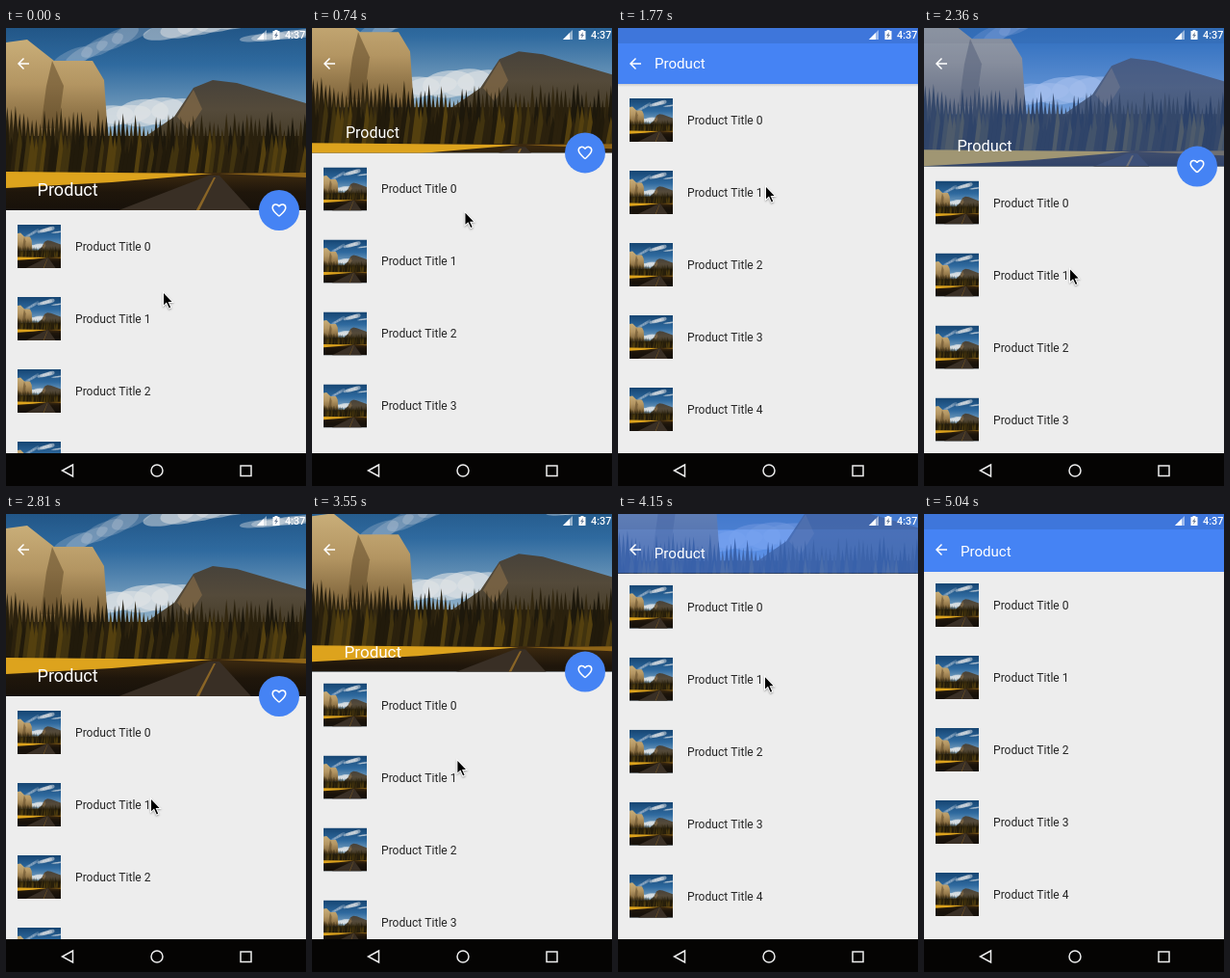
These frames come from a looping animation (312 by 475 pixels, 5400 ms). An HTML page with a canvas:

```html
<!DOCTYPE html>
<html lang="en">
<head>
<meta charset="utf-8">
<title>Collapsing header</title>
<style>
  html, body { margin: 0; width: 100%; height: 100%; overflow: hidden; background: #ededed; }
  canvas { display: block; width: 100vw; height: 100vh; }
</style>
</head>
<body>
<canvas id="stage"></canvas>
<script>
const W = 312, H = 475, NAV = 441;
const FULL = 189, MIN = 58, REST = 60;
const LOOP = 5400, STEP = 147.7;
const PHOTO_TOP = -34, PHOTO_H = 245;
const BLUE = '#4583f4';
const canvas = document.getElementById('stage');
const ctx = canvas.getContext('2d');

const clamp = v => Math.max(0, Math.min(1, v));
const mix = (a, b, t) => a + (b - a) * t;
const phase = (s, from, to) => clamp((s - from) / (to - from));
const rand = n => { const v = Math.sin(n * 127.1) * 43758.5453; return v - Math.floor(v); };

// Three drags: up, down, up again.
function poseAt(s) {
  const first = phase(s, 2, 8.6);
  const down = 1 - (1 - phase(s, 12, 19)) ** 1.25;
  const lift = phase(s, 21, 28.05);
  const leave = phase(s, 29, 33);
  const up = lift ** 1.9;
  const head = s < 12 ? mix(FULL, MIN, first)
    : s < 21 ? mix(MIN, FULL, down)
    : mix(FULL, REST, up);
  const grip = s < 12 ? mix(275, 150, phase(s, 2, 6.5))
    : s < 21 ? head + 107
    : mix(296, 168, lift ** 1.36);
  return {
    head,
    scroll: s < 12 ? 15 * phase(s, 8, 9) : 3 * phase(s, 21, 24),
    scrim: phase(s, 5.2, 9) - phase(s, 13.6, 17.6) + phase(s, 25.4, 29.2),
    x: 164 - 10 * first - 3 * down + 2 * up + 97 * leave,
    y: mix(grip, 443, leave),
    pointer: s < 34
  };
}

function rect(color, x, y, w, h) {
  ctx.fillStyle = color;
  ctx.fillRect(x, y, w, h);
}

function trace(...p) {
  ctx.beginPath();
  for (let i = 0; i < p.length; i += 2) ctx.lineTo(p[i], p[i + 1]);
  ctx.closePath();
}

function poly(color, ...p) {
  ctx.fillStyle = color;
  trace(...p);
  ctx.fill();
}

function disc(color, x, y, rx, ry = rx, tilt = 0) {
  ctx.fillStyle = color;
  ctx.beginPath();
  ctx.ellipse(x, y, rx, ry, tilt, 0, Math.PI * 2);
  ctx.fill();
}

function text(str, x, y, size, color, weight = 400) {
  ctx.font = `${weight} ${size}px Roboto, sans-serif`;
  ctx.fillStyle = color;
  ctx.fillText(str, x, y);
}

function clipped(x, y, w, h, draw) {
  ctx.save();
  ctx.beginPath();
  ctx.rect(x, y, w, h);
  ctx.clip();
  draw();
  ctx.restore();
}

function vertical(y0, y1, ...colors) {
  const g = ctx.createLinearGradient(0, y0, 0, y1);
  colors.forEach((c, i) => g.addColorStop(i / (colors.length - 1), c));
  return g;
}

// Overlapping puffs make one soft cloud.
function cloud(x, y, w, h, tilt, alpha) {
  for (let i = 0; i < 5; i++) {
    const d = (i - 2) * w / 5;
    disc(`rgba(225,228,230,${alpha})`, x + d, y + d * tilt, w * .3, h * (.6 + rand(i + x) * .4), tilt);
  }
}

function pines(base, rise, tones, seed) {
  for (let i = 0; i < 75; i++) {
    const x = i * 4.3 - 3;
    const top = base - rise * (.55 + .45 * rand(i + seed)) + 8 * clamp(x / 160);
    ctx.fillStyle = tones[Math.floor(rand(i + seed + 200) * tones.length)];
    trace(x, top, x + 6, 152, x - 6, 152);
    ctx.fill();
  }
}

function scene() {
  rect(vertical(PHOTO_TOP, 110, '#164572', '#2f6a9f', '#8fb0c8'), 0, PHOTO_TOP, W, PHOTO_H);
  cloud(100, 18, 80, 10, -.45, .22);
  cloud(205, -4, 90, 13, -.2, .5);
  cloud(285, 8, 60, 5, -.1, .4);
  cloud(142, 88, 90, 15, -.1, .6);

  poly(vertical(12, 105, '#c9ae79', '#b39562', '#7d633a'),
    0, 15, 22, 12, 50, 34, 90, 34, 102, 54, 106, 112, 0, 112);
  poly('rgba(90,68,36,.5)', 48, 34, 60, 60, 54, 104, 36, 104, 42, 60);
  poly(vertical(54, 115, '#47423a', '#544a3a', '#463c28'),
    140, 116, 175, 92, 195, 62, 215, 54, 240, 57, W, 78, W, 118);
  poly('rgba(140,112,74,.6)', 178, 92, 195, 64, 204, 84, 190, 106);

  rect('#2a210f', 0, 112, W, 40);
  pines(122, 44, ['#1d180c', '#2a210e', '#332811'], 1);
  pines(138, 42, ['#211a0b', '#41330f', '#54400f', '#2b210d'], 400);

  rect(vertical(150, 190, '#3d2a10', '#1f160b', '#17110a'), 0, 150, W, 61);
  poly('#dda31d', 0, 149, 215, 151, 110, 160, 0, 166);
  poly('#8e6417', 222, 151, W, 150, W, 155);
  poly('#392f25', 211, 153, 222, 153, 275, 211, 60, 211);
  poly('#8a6526', 216, 155, 218, 155, 190, 211, 186, 211);
}

function list(head, scroll) {
  clipped(0, head, W, NAV - head, () => {
    for (let i = 0; i < 6; i++) {
      const y = head + 15 - scroll + i * 75;
      clipped(12, y, 45, 45, () => {
        ctx.translate(12, y);
        ctx.scale(45 / W, 45 / PHOTO_H);
        ctx.translate(0, -PHOTO_TOP);
        scene();
      });
      text('Product Title ' + i, 72, y + 27, 12.1, '#252525');
    }
  });
}

function header(head, scrim) {
  clipped(0, 0, W, head, () => {
    ctx.save();
    ctx.translate(0, (head - FULL) / 2);
    scene();
    ctx.restore();
    ctx.globalAlpha = scrim;
    rect(BLUE, 0, 0, W, head);
    rect('rgba(0,0,0,.1)', 0, 0, W, 16);
  });
  if (head < 59) rect(vertical(head, head + 3, 'rgba(0,0,0,.14)', 'rgba(0,0,0,0)'), 0, head, W, 3);

  const t = clamp((FULL - head) / (FULL - MIN));
  const size = mix(18.1, 15.1, 1 - (1 - t) ** 2);
  text('Product', mix(32.5, 38, t), head - 21 + size * .35, size, '#fff');
}

function backArrow() {
  ctx.strokeStyle = '#fff';
  ctx.lineWidth = 1.5;
  ctx.beginPath();
  ctx.moveTo(18.5, 31.5);
  ctx.lineTo(13, 37);
  ctx.lineTo(18.5, 42.5);
  ctx.moveTo(13, 37);
  ctx.lineTo(24, 37);
  ctx.stroke();
}

function statusBar() {
  poly('rgba(255,255,255,.5)', 261, 12, 271, 2, 271, 12);
  poly('#fff', 261, 12, 268, 5, 268, 12);
  rect('#fff', 279.5, 2, 3, 1);
  rect('#fff', 277.5, 3, 7, 9);
  poly('#6d7f9a', 282, 4, 279, 8, 280.7, 8, 280, 11, 283, 7, 281.4, 7);
  text('4:37', 290, 11, 10.9, '#fff', 500);
}

function heart() {
  ctx.beginPath();
  ctx.moveTo(0, 6.2);
  for (const side of [1, -1]) {
    ctx.moveTo(0, 6.2);
    ctx.bezierCurveTo(side * 4, 2.6, side * 6.8, .4, side * 6.8, -2.6);
    ctx.bezierCurveTo(side * 6.8, -6.4, side * 2, -7.4, 0, -4);
  }
  ctx.strokeStyle = '#fff';
  ctx.lineWidth = 1.5;
  ctx.stroke();
}

function button(head) {
  const s = phase(head, 82, 102);
  if (!s) return;
  ctx.save();
  ctx.translate(284, head);
  ctx.scale(s, s);
  ctx.globalAlpha = s;
  disc(BLUE, 0, 0, 21);
  heart();
  ctx.restore();
}

function navBar() {
  rect('#050403', 0, NAV, W, H - NAV);
  ctx.strokeStyle = '#eee';
  ctx.lineWidth = 1.5;
  trace(69.5, 453, 58.5, 459, 69.5, 465);
  ctx.stroke();
  ctx.beginPath();
  ctx.arc(157, 459, 6, 0, Math.PI * 2);
  ctx.stroke();
  ctx.strokeRect(244, 454, 11, 10.5);
}

function cursor(x, y) {
  ctx.save();
  ctx.translate(x, y);
  trace(0, 0, 0, 12.2, 3, 9.6, 5.7, 15.4, 7.2, 14.7, 4.6, 9.1, 8.6, 9);
  ctx.shadowColor = 'rgba(0,0,0,.35)';
  ctx.shadowBlur = 2;
  ctx.shadowOffsetY = 1;
  ctx.strokeStyle = '#fff';
  ctx.lineWidth = 2;
  ctx.stroke();
  ctx.shadowColor = 'transparent';
  ctx.fillStyle = '#000';
  ctx.fill();
  ctx.restore();
}

function draw(time) {
  // The screen refreshes in even steps.
  const pose = poseAt(Math.floor((time % LOOP) / STEP + .05));
  rect('#ededed', 0, 0, W, H);
  list(pose.head, pose.scroll);
  header(pose.head, pose.scrim);
  backArrow();
  statusBar();
  button(pose.head);
  navBar();
  if (pose.pointer) cursor(pose.x, pose.y);
}

function resize() {
  const dpr = window.devicePixelRatio || 1;
  canvas.width = Math.round(innerWidth * dpr);
  canvas.height = Math.round(innerHeight * dpr);
  ctx.setTransform(canvas.width / W, 0, 0, canvas.height / H, 0, 0);
}

addEventListener('resize', resize);
resize();
const start = performance.now();
function frame() {
  draw(performance.now() - start);
  requestAnimationFrame(frame);
}
frame();
</script>
</body>
</html>
```
